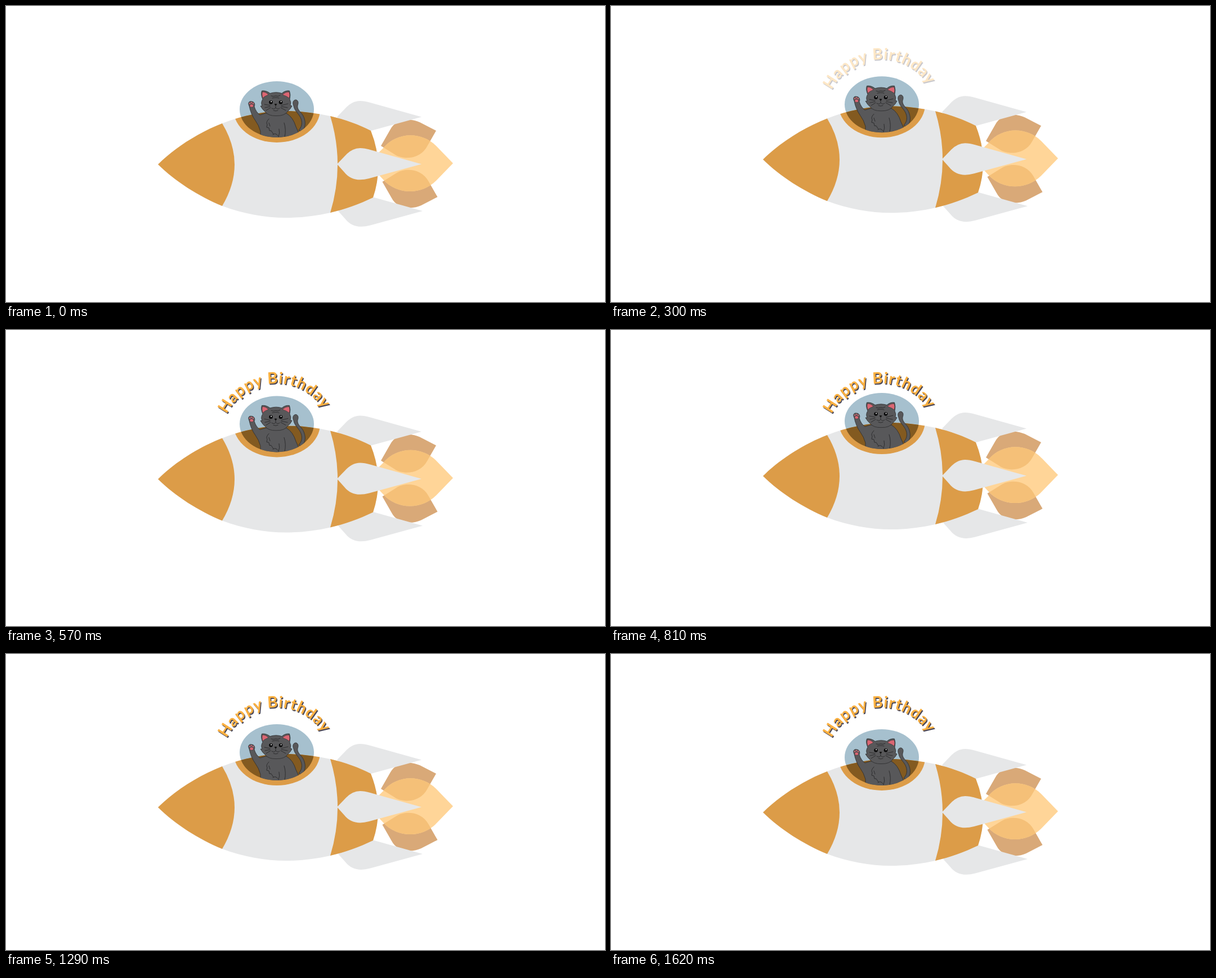
Recreate the animation shown at these times as an HTML page. Size 1064 px wide and 527 px high, loop 1650 ms.

```html
<!DOCTYPE html>
<html lang="en">
<head>
<meta charset="utf-8">
<title>Birthday rocket</title>
<style>
  html, body { margin: 0; width: 100%; height: 100%; overflow: hidden; background: #fff; }
  svg { display: block; width: 100vw; height: 100vh; }
  text { font: 700 28px Lato, "Open Sans", sans-serif; letter-spacing: 1px; text-anchor: middle; }
  .grey { fill: #e6e7e8; }
  .orange { fill: #dc9c48; }
  .fur { fill: #58585a; stroke: #2b2b2d; stroke-width: .8; stroke-linejoin: round; }
  .pink { fill: #db6673; stroke: #2b2b2d; stroke-width: .5; }
  .line { fill: none; stroke: #222224; stroke-width: .8; stroke-linecap: round; }
</style>
</head>
<body>
<svg viewBox="0 0 1064 527">
  <defs>
    <path id="hull" d="M270 282C300 252 343 225 384 209C422 194 460 187 497 187C524 187 550 190.500 576 196C602 202 627 211 648 222Q672 282 652 341C627 353 602 362 576 368C550 374 524 377 497 377C460 377 422 370 384 356C343 339 300 312 270 282Z"/>
    <path id="fin" d="M588 281.500L601 268Q614 253 629 253Q637 253 647 256L738 281.500L645 307Q616 315 601 296Z"/>
    <path id="jet" d="M643 280L670 253C695 223 740 223 766 251L794 280L766 309C740 337 695 337 670 309Z"/>
    <path id="side" d="M666 249L682 221C693 199 720 200 735 207L764 222L748 250C735 274 704 274 690 264Z"/>
    <g id="sides">
      <use href="#side"/>
      <use href="#side" transform="matrix(1 0 0 -1 2.5 562)"/>
    </g>
    <path id="arc" d="M382 193A98 98 0 0 1 578 193"/>
    <clipPath id="inHull"><use href="#hull"/></clipPath>
    <clipPath id="inJet"><use href="#jet"/></clipPath>
    <clipPath id="inDome"><ellipse cx="481" cy="184" rx="66" ry="50"/></clipPath>
  </defs>

  <g id="rocket">
    <use href="#sides" fill="#d9a978"/>
    <use href="#jet" fill="#ffd598"/>
    <use href="#sides" fill="#f5c078" clip-path="url(#inJet)"/>

    <use href="#fin" class="grey" y="-84"/>
    <use href="#fin" class="grey" x="2" y="83.500"/>
    <ellipse cx="481" cy="184" rx="66" ry="50" fill="#a6c0ce"/>

    <use href="#hull" class="grey"/>
    <g clip-path="url(#inHull)">
      <path class="orange" d="M384 209Q428 282 384 356L260 400V160Z"/>
      <path class="orange" d="M576 196Q602 282 576 368L600 400H700V160H600Z"/>
      <ellipse class="orange" cx="481" cy="184" rx="77" ry="59"/>
      <ellipse cx="481" cy="184" rx="66" ry="50" fill="#835a20"/>
    </g>
    <use href="#fin" class="grey"/>

    <g clip-path="url(#inDome)">
      <path class="fur" d="M511 178C508 171 511 167 515 167C519 168 520 172 518 177C517 184 522 187 527 194C534 206 532 219 524 224L520 221C528 213 526 202 521 195C517 189 512 185 511 178Z"/>
      <path class="fur" d="M432 178C429 172 432 169 436 170C441 170 443 175 441 179Q444 189 451 194L461 191H498Q510 198 515 215L520 226V240H452V223Q449 212 443 204Q435 193 432 178Z"/>
      <path class="pink" d="M433 177Q435 173 439 176Q441 180 437 180Q433 181 433 177Z"/>
      <g fill="#db6673">
        <circle cx="433" cy="173.500" r="1.200"/>
        <circle cx="436" cy="172" r="1.200"/>
        <circle cx="439" cy="173.500" r="1.200"/>
      </g>
      <path class="line" d="M467 201Q461 207 464 211L463 216L467 217L468 222L471 222L475 228M467 208L469 214M484 233Q487 226 485 219M495 233Q498 220 494 208M474 229Q479 225 483 231"/>

      <path class="fur" d="M456 166Q452 157 454.500 151Q462 150 469 155.500Q480 152 490 155.500Q496 150 503.500 151Q506 158 504 166Q507 172 505 177L508 178Q505 184 501 187Q495 196 480 195.500Q466 196 460 188Q456 185 452 178L455 178Q452 172 456 166Z"/>
      <path class="pink" d="M456 164Q454 157 455.500 153Q462 153 466 158Q460 160 456 164Z"/>
      <path class="pink" d="M503 164Q505 157 502.500 153Q496 153 491 158Q498 160 503 164Z"/>
      <path class="line" d="M471 160Q475 162 479 160Q483 162 487 159M473 164Q480 162 485 164"/>
      <g id="eyes"></g>
      <path d="M476.500 174.500Q479 173.500 481.500 174.500L479 178Z" fill="#111"/>
      <path class="line" d="M479 178V181Q477 185 472 182M479 181Q482 185 486 182M475 186Q479 188 483 186"/>
      <path class="line" stroke-width=".6" d="M469 177L459 175M469 179L460 181M470 181L462 186M489 177L501 174M489 179L500 181M488 181L497 186"/>
    </g>
  </g>

  <g id="greeting">
    <text fill="#4b4858" transform="translate(1.5 2)"><textPath href="#arc" startOffset="48.400%">Happy Birthday</textPath></text>
    <text fill="#fbb040"><textPath href="#arc" startOffset="48.400%">Happy Birthday</textPath></text>
  </g>
</svg>
<script>
  const LOOP = 1650, STEP = 30;
  const rise = [[0, 0], [780, -22.7], [1620, 0], [LOOP, 0]];
  const fade = [[0, 0], [200, 0], [540, 1], [LOOP, 1]];
  const byId = id => document.getElementById(id);
  const rocket = byId("rocket"), greeting = byId("greeting");

  byId("eyes").innerHTML = [470.5, 488].map(x =>
    `<circle cx="${x}" cy="171.500" r="3.300" fill="#0c0c0d"/>` +
    `<circle cx="${x + 0.6}" cy="170.300" r="1" fill="#fff"/>`).join("");

  // Linear interpolation through [time, value] keys
  function at(keys, t) {
    const i = keys.findIndex(k => k[0] > t);
    const [t0, a] = keys[i - 1], [t1, b] = keys[i];
    return a + (b - a) * (t - t0) / (t1 - t0);
  }

  function draw(ms) {
    const t = Math.floor((ms % LOOP) / STEP) * STEP;
    rocket.setAttribute("transform", `translate(0 ${at(rise, t).toFixed(2)})`);
    greeting.setAttribute("opacity", at(fade, t).toFixed(3));
  }

  const start = performance.now();
  function tick() {
    draw(performance.now() - start);
    requestAnimationFrame(tick);
  }
  tick();
</script>
</body>
</html>
```
